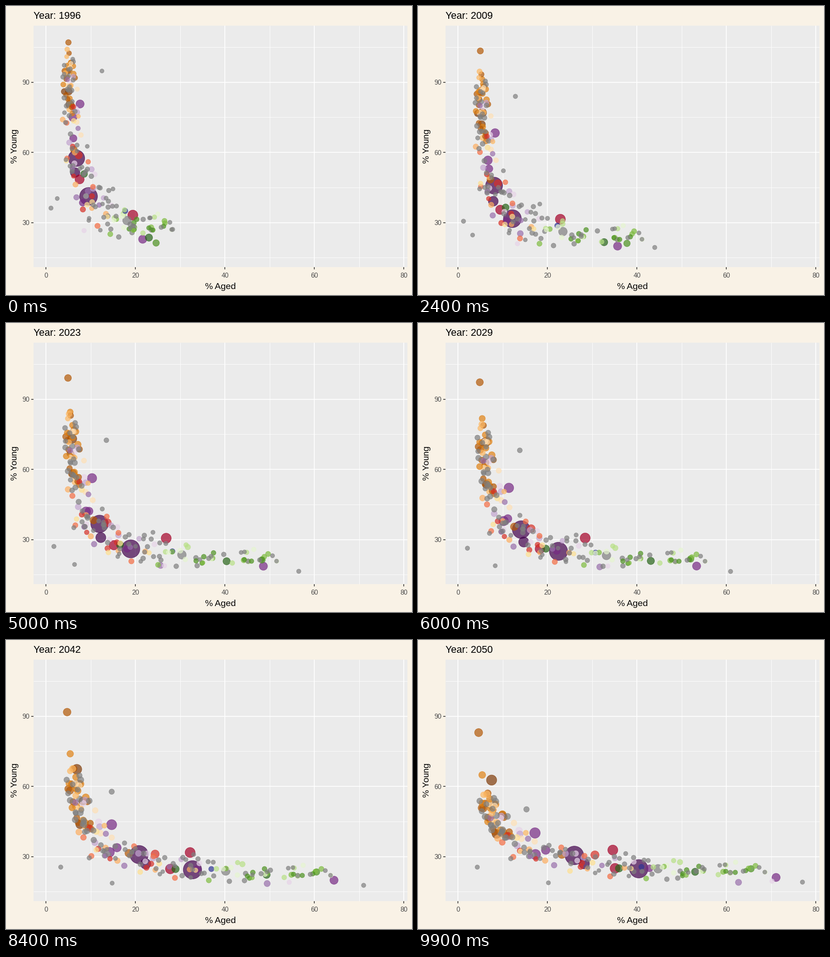
A matplotlib script for the animation above (10000 ms loop, 885 by 632 pixels).

```python
import matplotlib.pyplot as plt
import numpy as np
from matplotlib.animation import FuncAnimation
from matplotlib.colors import to_rgba

W, H, DPI = 885, 632, 100
FRAMES = 100
PX = 72 / DPI
LEFT, RIGHT, TOP, BOTTOM = 60, 875, 43, 571

PURPLE = ["#40004B", "#762A83", "#9970AB", "#C2A5CF", "#E7D4E8"]
ORANGE = ["#7F3B08", "#B35806", "#E08214", "#FDB863", "#FEE0B6"]
GREEN = ["#276419", "#4D9221", "#7FBC41", "#B8E186", "#E6F5D0"]
RED = ["#A50026", "#D73027", "#F46D43", "#FDAE61", "#FEE090"]
BLUE = ["#313695", "#4575B4"]
GREY = "#7F7F7F"


def sx(aged):
    return 87.3 + 9.75 * aged


def sy(young):
    return 627.2 - 5.117 * young


# Landmark bubbles: colour, radius, (aged, young) at the start and at the end
bubbles = [
    (PURPLE[0], 19.5, (9.5, 41.2), (40.4, 24.8)),
    (PURPLE[0], 18, (6.8, 57.5), (26, 30.5)),
    (PURPLE[0], 10.5, (6.5, 51.4), (28.2, 27)),
    (PURPLE[1], 9, (21.6, 22.9), (71.1, 21.1)),
    (PURPLE[1], 9, (7.6, 80.7), (17.2, 40.1)),
    (PURPLE[1], 9, (6, 75), (17.3, 30.9)),
    (PURPLE[1], 8, (6.1, 66), (19.6, 32.8)),
    (PURPLE[1], 7.5, (8.2, 38.5), (42.8, 25)),
    (PURPLE[2], 6.5, (9.4, 43.5), (62.7, 19)),
    (PURPLE[4], 5, (8.5, 26.6), (70.2, 19.5)),
    (ORANGE[0], 8.8, (5.3, 80.5), (7.5, 62.7)),
    (ORANGE[0], 7.5, (5.1, 86), (8.6, 39.7)),
    (ORANGE[0], 6.8, (4.1, 86), (9.9, 47.7)),
    (ORANGE[1], 6.2, (5, 107), (4.6, 83)),
    (ORANGE[1], 7.5, (6.2, 61.2), (23.2, 30.9)),
    (ORANGE[2], 5.5, (5.4, 97.1), (5.4, 64.9)),
    (RED[0], 11, (19.4, 33.2), (34.6, 32.8)),
    (RED[0], 10, (7.5, 48.5), (35.1, 25)),
    (RED[1], 8, (7.3, 58.8), (30.6, 30.7)),
    (BLUE[0], 5.8, (17.7, 35), (41, 25.6)),
    (GREEN[0], 8, (23, 23.6), (53, 23.5)),
    (GREEN[1], 7.2, (24.6, 21.3), (65.5, 24.8)),
    (GREEN[0], 7.5, (8.5, 50.8), (36, 25)),
    (GREY, 9.5, (18.1, 30.9), (44.7, 24.8)),
    (GREY, 7.2, (5.1, 95), (7.3, 52.4)),
    (GREY, 4.8, (1.1, 36.2), (4.3, 25.5)),
    (GREY, 4.5, (2.5, 40.3), (20.2, 18.8)),
    (GREY, 4.8, (28.3, 27.1), (77, 19.1)),
    (GREY, 4.5, (12.5, 94.8), (15.3, 50.2)),
]

rng = np.random.default_rng(5)


def crowd(colors, n, lo, hi, r, spread=1.0):
    """Add n bubbles along the young-to-aged hyperbola, from rank lo to hi."""
    for i in range(n):
        u = lo + (hi - lo) * (i + rng.uniform()) / n
        da, dy = np.clip(rng.normal(0, spread, 2), -2, 2) * (0.4 + 2.2 * u, 4.5 - 2 * u)
        a0, a1 = 4.9 + 20 * u ** 2.5, 6 + 58 * u ** 1.8
        start = a0 + da, max(20 + 150 / (a0 - 3) + dy, 20.5)
        end = a1 + 1.6 * da, max(20 + 215 / a1 + 0.7 * dy, 20)
        color = colors[i % len(colors)]
        bubbles.append((color, r + rng.uniform(-0.4, 0.7), start, end))


crowd([GREY], 72, 0.03, 1, 4.7, 1.3)
crowd(ORANGE[1:3], 22, 0, 0.27, 5.7)
crowd(ORANGE[3:], 12, 0.02, 0.36, 5)
crowd(PURPLE[2:], 18, 0.12, 0.72, 5.5)
crowd(RED[1:], 20, 0.22, 0.76, 5.3)
crowd(GREEN[1:], 26, 0.8, 1, 5.3)

bubbles.sort(key=lambda b: -b[1])
colors = [to_rgba(b[0], 0.7) for b in bubbles]
radius = np.array([b[1] for b in bubbles])
aged0, young0 = np.array([b[2] for b in bubbles]).T
aged1, young1 = np.array([b[3] for b in bubbles]).T

# Young populations age late; low final birth rates are reached early.
age_pow = np.maximum(2.4 - 0.07 * aged0, 0.8)
young_pow = 0.3 + 1500 / young1 ** 2
growth = 0.006 * np.maximum(young0 - 35, 0)


def state(t):
    aged = aged0 + (aged1 - aged0) * t ** age_pow
    young = young1 + (young0 - young1) * (1 - t) ** young_pow
    young -= 0.12 * np.minimum(aged0, 25) * np.sin(np.pi * t)
    area = (2 * radius * (1 + growth * t) * PX) ** 2
    return np.column_stack([sx(aged), sy(young)]), area


plt.rcParams.update({"font.family": "Liberation Sans", "text.hinting": "native",
                     "text.hinting_factor": 1})
fig = plt.figure(figsize=(W / DPI, H / DPI), dpi=DPI, facecolor="#F9F2E6")
ax = fig.add_axes([0, 0, 1, 1])
ax.set(xlim=(0, W), ylim=(H, 0))
ax.axis("off")
ax.add_patch(plt.Rectangle((LEFT, TOP), RIGHT - LEFT, BOTTOM - TOP,
                           color="#EBEBEB", lw=0, zorder=0))


def line(xs, ys, color, width):
    ax.plot(xs, ys, color=color, lw=width * PX, solid_capstyle="butt", zorder=1)


def label(x, y, text, size, color="black", **kw):
    return ax.text(x, y, text, fontsize=size * PX, color=color, **kw)


for v in range(0, 81, 10):
    line([sx(v)] * 2, [TOP, BOTTOM], "white", 0.9 if v % 20 else 1.8)
for v in range(15, 106, 15):
    line([LEFT, RIGHT], [sy(v)] * 2, "white", 0.9 if v % 30 else 1.8)
for v in range(0, 81, 20):
    line([sx(v)] * 2, [BOTTOM, BOTTOM + 4.7], "#333333", 1.6)
    label(sx(v), 593.5, str(v), 14.93, "#4D4D4D", ha="center")
for v in (30, 60, 90):
    line([LEFT - 4.7, LEFT], [sy(v)] * 2, "#333333", 1.6)
    label(51, sy(v) + 5.5, str(v), 14.93, "#4D4D4D", ha="right")

label(467.5, 619, "% Aged", 18.67, ha="center")
label(18.5, 307, "% Young", 18.67, ha="center", va="center", rotation=90)
title = label(LEFT, 28.5, "", 22.4)

start, sizes = state(0)
dots = ax.scatter(start[:, 0], start[:, 1], s=sizes, facecolors=colors,
                  edgecolors=colors, linewidths=0.9 * PX, zorder=2)


def update(i):
    t = i / (FRAMES - 1)
    pos, area = state(t)
    dots.set_offsets(pos)
    dots.set_sizes(area)
    title.set_text(f"Year: {round(1996 + 54 * t)}")
    return dots, title


anim = FuncAnimation(fig, update, frames=FRAMES, interval=100, repeat=True, repeat_delay=0)
plt.show()
```
